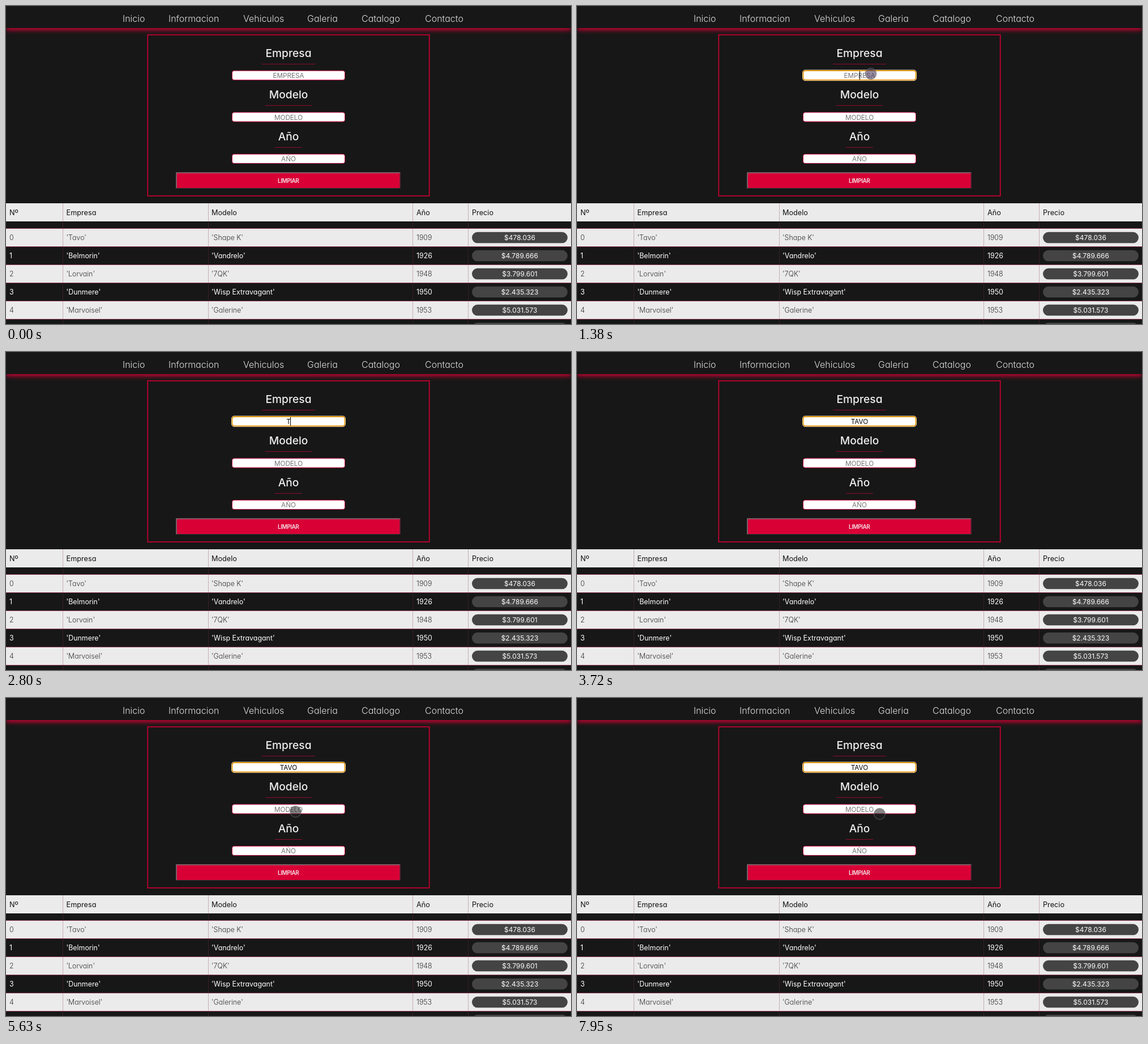
Write an HTML page that moves like this. It is 998 px wide and 561 px high and loops after 8 s.

```html
<!DOCTYPE html>
<html lang="es">
<head>
<meta charset="utf-8">
<title>Catalogo</title>
<style>
html, body { margin: 0; width: 100%; height: 100%; overflow: hidden; background: #171717; }
header { position: absolute; left: 0; top: 0; width: 998px; height: 39px; background: #171717; box-shadow: 0 3px 8px #d90036; }
svg { position: absolute; left: 0; top: 0; font: 300 12.4px Inter, "Open Sans", sans-serif; font-feature-settings: "cv11"; }
.nav { font-size: 16px; fill: #dedede; }
.title { font-size: 19.2px; font-weight: 500; fill: #eee; text-anchor: middle; }
.field { font-size: 11.7px; font-weight: 400; fill: #757575; text-anchor: middle; }
.button { font-size: 10px; font-weight: 600; letter-spacing: -.5px; fill: #f5dfe4; text-anchor: middle; }
.head { font-size: 12.7px; font-weight: 400; fill: #111; }
.price { font-size: 12px; font-weight: 400; fill: #fff; text-anchor: middle; }
.light { fill: #333; }
.dark { fill: #fff; font-weight: 400; }
</style>
</head>
<body>
<header></header>
<svg id="stage" width="998" height="561" viewBox="0 0 998 561"></svg>
<script>
const stage = document.getElementById('stage');

function add(tag, attrs, text = '') {
  const el = document.createElementNS('http://www.w3.org/2000/svg', tag);
  for (const k in attrs) el.setAttribute(k, attrs[k]);
  el.textContent = text;
  return stage.appendChild(el);
}
const rect = (x, y, width, height, fill, more) => add('rect', { x, y, width, height, fill, ...more });
const label = (x, y, cls, text) => add('text', { x, y, class: cls }, text);
const show = (el, on) => el.setAttribute('visibility', on ? 'visible' : 'hidden');

// Navigation and search form
[['Inicio', 206], ['Informacion', 287], ['Vehiculos', 419], ['Galeria', 532], ['Catalogo', 628], ['Contacto', 740]]
  .forEach(([text, x]) => label(x, 27.5, 'nav', text));

rect(250.3, 50.8, 497.4, 284.2, 'none', { stroke: '#c90032', 'stroke-width': 1.7 });
const fields = [['Empresa', 94], ['Modelo', 82], ['Año', 48]].map(([text, line], i) => {
  const y = i * 73.6;
  label(499, 89.5 + y, 'title', text);
  rect(499 - line / 2, Math.round(101.7 + y), line, 1, '#8f0a2d');
  rect(399.5, 114.2 + y, 199, 16.2, '#fff', { rx: 3.5, stroke: '#d0154a' });
  return label(499, 127 + y, 'field', text.toUpperCase());
});

rect(301, 293.5, 395.5, 28.5, '#d90036');
add('path', { d: 'M301 322V294.2H696.5', fill: 'none', stroke: '#767676', 'stroke-width': 1.6 });
add('path', { d: 'M301 321.5H696V294', fill: 'none', stroke: '#40303a', 'stroke-width': 1.2 });
label(498.7, 312, 'button', 'LIMPIAR');

// Table
const columns = [6, 106.5, 363, 725, 823];
const rows = [
  ['Tavo', 'Shape K', 1909, '$478.036'],
  ['Belmorin', 'Vandrelo', 1926, '$4.789.666'],
  ['Lorvain', '7QK', 1948, '$3.799.601'],
  ['Dunmere', 'Wisp Extravagant', 1950, '$2.435.323'],
  ['Marvoisel', 'Galerine', 1953, '$5.031.573'],
];
rect(0, 348, 998, 32, '#ebebeb');
['Nº', 'Empresa', 'Modelo', 'Año', 'Precio'].forEach((text, i) => label(columns[i], 368.5, 'head', text));
for (let i = 0; i < 6; i++) {
  const y = 392.5 + i * 32, row = rows[i];
  if (i % 2 == 0) rect(0, y, 998, 32, '#ebebeb');
  rect(0, y - .5, 998, 1, '#a00030', { opacity: .5 });
  rect(823, y + 6.3, 169, 19.5, '#444', { rx: 9.75 });
  if (!row) continue;
  const cls = i % 2 ? 'dark' : 'light';
  [i, `'${row[0]}'`, `'${row[1]}'`, row[2]].forEach((text, c) => label(columns[c], y + 20.3, cls, text));
  label(907.5, y + 20.3, 'price', row[3]);
}
for (const x of [100, 357, 718, 816]) rect(x, 348, 1, 213, '#803048', { opacity: .32 });

// Focus ring, caret and pointer
const rings = [
  rect(398.5, 113, 201, 18.6, 'none', { rx: 4.5, stroke: '#f4ead8', 'stroke-width': 1 }),
  rect(399.6, 114.1, 198.8, 16.4, 'none', { rx: 3.5, stroke: '#e59700', 'stroke-width': 1.7 }),
];
const caret = rect(499, 115, 1, 15, '#000');
const pointer = add('circle', { r: 9.8, stroke: 'rgba(110,110,110,.65)', 'stroke-width': 1.2 });

const out = power => u => 1 - (1 - u) ** power;
const into = u => u ** 1.4;
// start, duration, x, y, easing
const moves = [
  [380, 0, 813.5, 445.5], [380, 800, 519.5, 125.5, out(2.6)],
  [1280, 0, 519, 119.5], [1380, 400, 759, 545, into],
  [5230, 0, 609.5, 480.5], [5230, 400, 511.5, 200.5, out(2.2)],
  [6030, 0, 511, 200], [6130, 0, 511.5, 200.5],
  [7140, 0, 516.5, 192.5], [7340, 0, 518.5, 193.5],
  [7850, 0, 526, 198], [7950, 0, 534.5, 204.5],
];
const keys = [2800, 3020, 3120, 3220];

function pointerAt(t) {
  let x = 0, y = 0;
  for (const [start, length, toX, toY, ease] of moves) {
    if (t < start) break;
    const tick = Math.floor((t - start) / 100) * 100;
    const u = length ? ease(Math.min(1, tick / length)) : 1;
    x += (toX - x) * u;
    y += (toY - y) * u;
  }
  return [x, y];
}

function draw(t) {
  const typed = 'TAVO'.slice(0, keys.filter(k => t >= k).length);
  const input = fields[0];
  input.textContent = typed || 'EMPRESA';
  input.style.fill = typed ? '#000' : '';
  caret.setAttribute('x', typed ? Math.round(498.6 + input.getComputedTextLength() / 2) : 499);
  show(caret, (t >= 1380 && t < 1900) || (t >= 2400 && t < 3720));
  rings.forEach(ring => show(ring, t >= 1380));

  const [x, y] = pointerAt(t);
  pointer.setAttribute('cx', x);
  pointer.setAttribute('cy', y);
  pointer.setAttribute('fill', t >= 1280 && t < 1480 ? 'rgba(70,50,85,.55)' : 'rgba(35,35,35,.55)');
  show(pointer, (t >= 380 && t < 1900) || t >= 5230);
}

const began = performance.now();
function frame() {
  draw((performance.now() - began) % 8000);
  requestAnimationFrame(frame);
}
frame();
</script>
</body>
</html>
```
